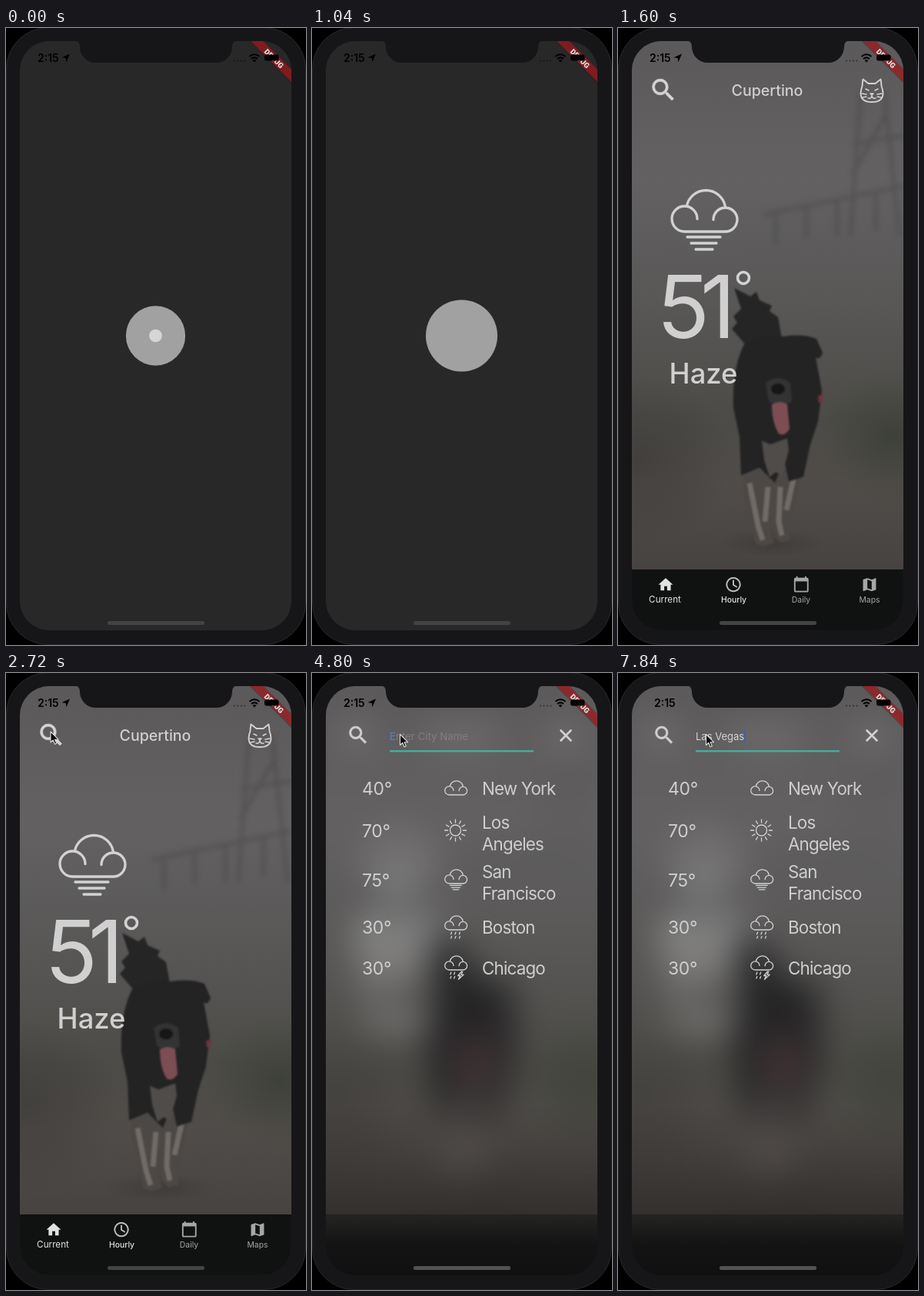
Write an HTML page that moves like this. It is 390x800 px and loops after 8000 ms.

```html
<!DOCTYPE html>
<html lang="en">
<head>
<meta charset="utf-8">
<title>Weather app</title>
<style>
  html, body { margin: 0; width: 100%; height: 100%; overflow: hidden; background: #000; }
  svg { display: block; width: 390px; height: 800px; font-family: Inter, "Liberation Sans", sans-serif; }
  text { white-space: pre; }
  .line { fill: none; stroke: #d2d2d2; stroke-linecap: round; stroke-linejoin: round; }
  .nav { fill: #a6a6a6; font-size: 10.4px; text-anchor: middle; }
  .nav .on { fill: #e2e2e2; }
  .nav .big { font-size: 11.7px; }
  #list { font-size: 22.4px; letter-spacing: -.037em; fill: #cecece; }
  #list .temp { font-size: 23px; letter-spacing: -.015em; }
</style>
</head>
<body>
<svg viewBox="0 0 390 800">
  <defs>
    <clipPath id="screen"><rect x="18" y="17" width="353" height="764" rx="38"/></clipPath>
    <clipPath id="photoArea"><rect x="18" y="17" width="353" height="685"/></clipPath>
    <linearGradient id="fog" x2="0" y2="1">
      <stop stop-color="#585657"/><stop offset=".3" stop-color="#636162"/>
      <stop offset=".5" stop-color="#585756"/><stop offset=".68" stop-color="#4c4b47"/>
      <stop offset=".78" stop-color="#504c49"/><stop offset="1" stop-color="#423e3b"/>
    </linearGradient>
    <radialGradient id="grass">
      <stop stop-color="#373c32" stop-opacity=".7"/><stop offset="1" stop-color="#3d4238" stop-opacity="0"/>
    </radialGradient>
    <radialGradient id="shade">
      <stop stop-color="#2c2a29" stop-opacity=".35"/><stop offset="1" stop-color="#2c2a29" stop-opacity="0"/>
    </radialGradient>
    <linearGradient id="edge">
      <stop stop-color="#000" stop-opacity="0"/><stop offset="1" stop-color="#000" stop-opacity=".45"/>
    </linearGradient>
    <linearGradient id="dim" x2="0" y2="1">
      <stop stop-opacity="0"/><stop offset="1" stop-opacity=".3"/>
    </linearGradient>
    <linearGradient id="dock" x2="0" y2="1">
      <stop stop-color="#252423"/><stop offset=".5" stop-color="#131313"/><stop offset="1" stop-color="#101010"/>
    </linearGradient>
    <path id="cloud" d="M-25.5 0a16.5 16.5 0 1 1 16.5-16.5M-22.7-33a25.5 25.5 0 0 1 50 0M12-15.500a15.5 15.5 0 1 1 15.5 15.5H-25.5"/>
    <path id="glass" d="M15.5 14h-.79l-.28-.27A6.471 6.471 0 0 0 16 9.5 6.5 6.5 0 1 0 9.5 16c1.61 0 3.09-.59 4.23-1.57l.27.28v.79l5 4.99L20.49 19zm-6 0C7.01 14 5 11.99 5 9.5S7.01 5 9.5 5 14 7.01 14 9.5 11.99 14 9.5 14z" stroke="#d2d2d2" stroke-width=".4"/>
  </defs>

  <rect x=".5" y="-.5" width="389" height="800" rx="54" fill="#161618" stroke="#28282a"/>

  <g clip-path="url(#screen)">
    <rect x="18" y="17" width="353" height="764" fill="#282828"/>
    <g id="loader" fill="#fff" fill-opacity=".56">
      <circle id="ballA" cx="194.5" cy="399"/><circle id="ballB" cx="194.5" cy="399"/>
    </g>

    <g id="page">
      <rect x="4" y="17" width="14" height="764" fill="url(#edge)"/>
      <g clip-path="url(#photoArea)">
        <g id="content">
          <rect x="-60" y="-50" width="510" height="820" fill="url(#fog)"/>
          <g style="filter:blur(3px)" fill="none" stroke="#3a3839" stroke-opacity=".3" stroke-width="5">
            <path d="M316 80L302 270M346 80L366 270M306 150L371 140M304 190L350 110M371 205L190 242M205 240V280M245 232V272M285 224V270M335 214V262"/>
          </g>
          <ellipse cx="355" cy="530" rx="95" ry="85" fill="url(#grass)"/>
          <ellipse cx="30" cy="560" rx="120" ry="110" fill="url(#shade)"/>
          <ellipse cx="200" cy="668" rx="70" ry="18" fill="url(#shade)"/>
          <g style="filter:blur(1.2px)">
            <path d="M163 570L206 572 202 625 197 648 203 668 188 672 178 668 174 640 164 605zM203 575L239 570 232 610 222 640 224 664 211 667 203 658z" fill="#4c4845"/>
            <path d="M171 590L182 645 188 664M195 595L191 640M211 595L209 640 213 658M228 585L219 625" fill="none" stroke="#716b67" stroke-width="7"/>
            <path d="M151 337L172 348 180 342 184 353 200 360 197 367 208 375 213 402 190 416 165 410 148 390 155 382 150 374 160 364z" fill="#262526"/>
            <path d="M165 408Q190 397 215 400 240 396 258 403L266 421Q263 431 257 427L265 470 260 510 250 540 241 582 222 588 216 560 204 590 184 570 160 580 158 530 150 492Q148 440 165 408z" fill="#242324"/>
            <path d="M187 535L198 540 220 532 222 548 213 580 205 576 197 582 190 560z" fill="#504c4a"/>
            <path d="M192 460Q208 448 224 460L226 484 212 492 196 484z" fill="#343334"/>
            <ellipse cx="208" cy="468" rx="9" ry="7" fill="#171617"/>
            <path d="M200 488Q211 482 220 488L223 520Q217 530 209 526 200 512 200 488z" fill="#7c4e54"/>
            <path d="M260 477l6-2v9l-5 2z" fill="#74323a"/>
          </g>
          <use href="#glass" transform="translate(39.7 61.2) scale(1.6)" fill="#d4d4d4"/>
          <text x="194" y="88" font-size="19.6" font-weight="500" text-anchor="middle" fill="#d0d0d0">Cupertino</text>
          <g class="line" stroke-width="1.9">
            <path d="M318.500 66.500l7 5.500h9l7-5.500q1 6 1 9 2 5 2 9 0 11.500-14.500 11.500t-14.500-11.500q0-4 2-9 0-3 1-9z"/>
            <path d="M322 79l4 2M338 79l-4 2M328 85h4l-2 2zM330 88q-1 4-5 3M330 88q1 4 5 3M317 85l6 1M318 90l5-1M343 85l-6 1M342 90l-5-1" stroke-width="1.5"/>
          </g>
          <g class="line" stroke-width="3.3" transform="translate(112 264)">
            <use href="#cloud"/><path d="M-22 7H21M-17 15H16M-11 23H11"/>
          </g>
          <g fill="#d0d0d0">
            <text x="52 107" y="402" font-size="113" font-weight="400">51</text>
            <text x="111" y="461" font-size="36.4" font-weight="500" text-anchor="middle">Haze</text>
          </g>
          <circle cx="163" cy="324" r="7.5" class="line" stroke-width="3.6"/>
        </g>
      </g>
      <rect x="18" y="702" width="353" height="80" fill="#101211"/>
      <g class="nav">
        <path class="on" transform="translate(50.7 710.5) scale(.94)" d="M10 20v-6h4v6h5v-8h3L12 3 2 12h3v8z"/>
        <path class="line" stroke-width="1.9" d="M150 713a8.6 8.6 0 1 0 .01 0zM150 716.5v5.5l4 2.5" style="stroke:#bbb"/>
        <path transform="translate(227 710) scale(.94)" d="M20 3h-1V1h-2v2H7V1H5v2H4c-1.1 0-2 .9-2 2v16c0 1.1.9 2 2 2h16c1.1 0 2-.9 2-2V5c0-1.1-.9-2-2-2zm0 18H4V8h16z"/>
        <path transform="translate(315.7 710.5) scale(.94)" d="M20.5 3L15 5.100 9 3 3.360 4.900 3 5.400V20.500l.5.5L9 18.900l6 2.100 5.640-1.900.36-.5V3.500zM15 19l-6-2.110V5l6 2.110z"/>
        <text class="on big" x="61" y="745">Current</text>
        <text class="on" x="150.5" y="745" font-weight="500">Hourly</text>
        <text x="238" y="745">Daily</text>
        <text x="327" y="745">Maps</text>
      </g>
    </g>

    <g id="search">
      <rect x="18" y="560" width="353" height="142" fill="url(#dim)"/>
      <rect x="18" y="702" width="353" height="80" fill="url(#dock)"/>
      <use href="#glass" transform="translate(44.6 65.2) scale(1.28)" fill="#d0d0d0"/>
      <path class="line" d="M323.5 74.5l13 13m0-13l-13 13" stroke-width="2.6"/>
      <text id="hint" x="101" y="87" font-size="13.3" fill="#807e7e">Enter City Name</text>
      <text id="typed" x="101" y="87" font-size="13" fill="#d4d4d4"></text>
      <rect id="rule" x="101" width="187"/>
      <rect id="caret" y="73" width="2" height="17" fill="#2c68c0"/>
      <g id="list"></g>
    </g>
    <rect x="132" y="769" width="126" height="5" rx="2.5" fill="#444"/>
    <rect id="homeBar" x="132" y="769" width="126" height="5" rx="2.5" fill="#525252"/>

    <path d="M316.5 17H335L371 53V71.5z" opacity=".2"/>
    <path d="M318 17H334.5L371 53.5V70z" fill="#a51d21" opacity=".7"/>
    <text transform="translate(348.4 39.6) rotate(45)" y="3.5" font-family="Roboto, sans-serif" font-size="9.6" font-weight="900" text-anchor="middle" fill="#e4e4e4">DEBUG</text>
    <text id="clock" y="43.5" font-size="14" font-weight="600">2:15</text>
    <path id="arrow" d="M83 33.500L72.500 38.300l5.200.7.7 5.200z"/>
    <g fill-opacity=".5">
      <circle cx="297" cy="42.5" r="1"/><circle cx="301.5" cy="42.5" r="1"/>
      <circle cx="306" cy="42.5" r="1"/><circle cx="310.5" cy="42.5" r="1"/>
    </g>
    <path d="M316.500 37q6.500-5.500 13 0M319 40q4-3.300 8 0" fill="none" stroke="#000" stroke-width="2"/>
    <path d="M320.600 42q2.400-2 4.800 0L323 44.500z"/>
    <rect x="336" y="34.5" width="18.5" height="8" rx="2.4"/>
  </g>
  <path d="M89 16.500q7 0 7 8a20.500 20.500 0 0 0 20.500 20.500h157a20.500 20.500 0 0 0 20.500-20.500q0-8 7-8z" fill="#161618"/>
  <path id="pointer" d="M0 0v14l3.200-3 2.300 5.200 2.300-1-2.300-5h4.500z" fill="#0a0a0a" stroke="#ddd" stroke-width="1.1" stroke-linejoin="round"/>
</svg>
<script>
const $ = id => document.getElementById(id);
const set = (id, attrs) => { for (const k in attrs) $(id).setAttribute(k, attrs[k]); };
const ramp = (t, from, to) => Math.min(1, Math.max(0, (t - from) / (to - from)));
const smooth = x => x * x * (3 - 2 * x);
const mix = (a, b, k) => a + (b - a) * k;

const LOOP = 8000, SLIDE = 1120, FOCUS = 4720;
const KEYS = [[6080, 'L'], [6240, 'La'], [6400, 'Las'], [6560, 'Las '], [6880, 'Las V'],
  [7120, 'Las Veg'], [7280, 'Las Vega'], [7440, 'Las Vegas']];

// Temperature, its baseline, icon base (0 for the sun), strokes under the cloud, city lines
const CITIES = [
  ['40°', 158, 158, '', ['New York']],
  ['70°', 213, 0, '', ['Los', 'Angeles']],
  ['75°', 277, 273, 'M-22 7H21M-17 15H16M-11 23H11', ['San', 'Francisco']],
  ['30°', 338, 333, 'M-16 9l-3 8M0 9l-3 8M16 9l-3 8M-16 25l-3 7M0 25l-3 7M16 25l-3 7', ['Boston']],
  ['30°', 391, 385, 'M-18 9l-3 8M-4 9l-3 8M-18 25l-3 7M-4 25l-3 7M22 6L8 22H17L10 36 30 18H20L26 6z', ['Chicago']]
];
const rays = Array.from({ length: 12 }, (_, i) =>
  `<path d="M0-9.800V-14" transform="rotate(${i * 30})"/>`).join('');
const sun = `<g class="line" stroke-width="1.3" transform="translate(186.5 204)"><circle r="7"/>${rays}</g>`;

$('list').innerHTML = CITIES.map(([temp, y, base, extra, lines]) => {
  const icon = base
    ? `<g class="line" stroke-width="3.8" transform="translate(187 ${base}) scale(.34)"><use href="#cloud"/><path d="${extra}"/></g>`
    : sun;
  const top = y - (lines.length - 1) * 11;
  return `<text class="temp" x="65" y="${y}">${temp}</text>${icon}` +
    lines.map((s, i) => `<text x="221" y="${top + i * 28}">${s}</text>`).join('');
}).join('');

function drawLoader(t) {
  const v = Math.abs(2 * smooth(Math.min(1, .44 + t / 2000)) - 1);
  set('ballA', { r: 47 * (1 - v) });
  set('ballB', { r: 47 * v });
  const x = 25 * Math.exp((SLIDE - t) / 100) * (1 - ramp(t, 1120, 1480));
  const shown = t >= SLIDE;
  set('page', { transform: `translate(${shown ? x : 0} 0)`, visibility: shown ? 'visible' : 'hidden' });
  set('loader', { transform: `translate(${shown ? (x - 353) / 3 : 0} 0)` });
}

function drawSearch(t) {
  const k = smooth(ramp(t, 2840, 3640));
  $('content').style.filter = k ? `blur(${23 * k}px)` : 'none';
  set('search', { opacity: k });
  set('homeBar', { opacity: k });

  const focused = t >= FOCUS;
  set('rule', focused ? { y: 100.2, height: 2.2, fill: '#40b5a4' } : { y: 100.5, height: 1, fill: '#8a8888' });

  const [last, word] = KEYS.filter(key => key[0] <= t).pop() || [FOCUS, ''];
  $('typed').textContent = word;
  set('hint', { opacity: word ? 0 : 1 });
  const beat = (t - last) % 1000;
  const glow = beat < 500 ? 1 - ramp(beat, 380, 500) : ramp(beat, 850, 1000);
  const end = word ? $('typed').getComputedTextLength() : -1;
  set('caret', { x: 101 + end, opacity: focused ? glow : 0 });
}

function drawPointer(t) {
  const enter = 1 - (1 - ramp(t, 2000, 2720)) ** 2;
  const hop = smooth(ramp(t, 4300, 4700));
  const x = mix(mix(-12, 58, enter), 114.5, hop);
  const y = mix(mix(232, 76, enter), 79.5, hop);
  set('pointer', { transform: `translate(${x} ${y})` });
}

const start = performance.now();
function frame() {
  const t = (performance.now() - start) % LOOP;
  drawLoader(t);
  drawSearch(t);
  drawPointer(t);
  const late = t >= 6160;
  set('clock', { x: late ? 47 : 41 });
  set('arrow', { opacity: late ? 0 : 1 });
  requestAnimationFrame(frame);
}
frame();
</script>
</body>
</html>
```
